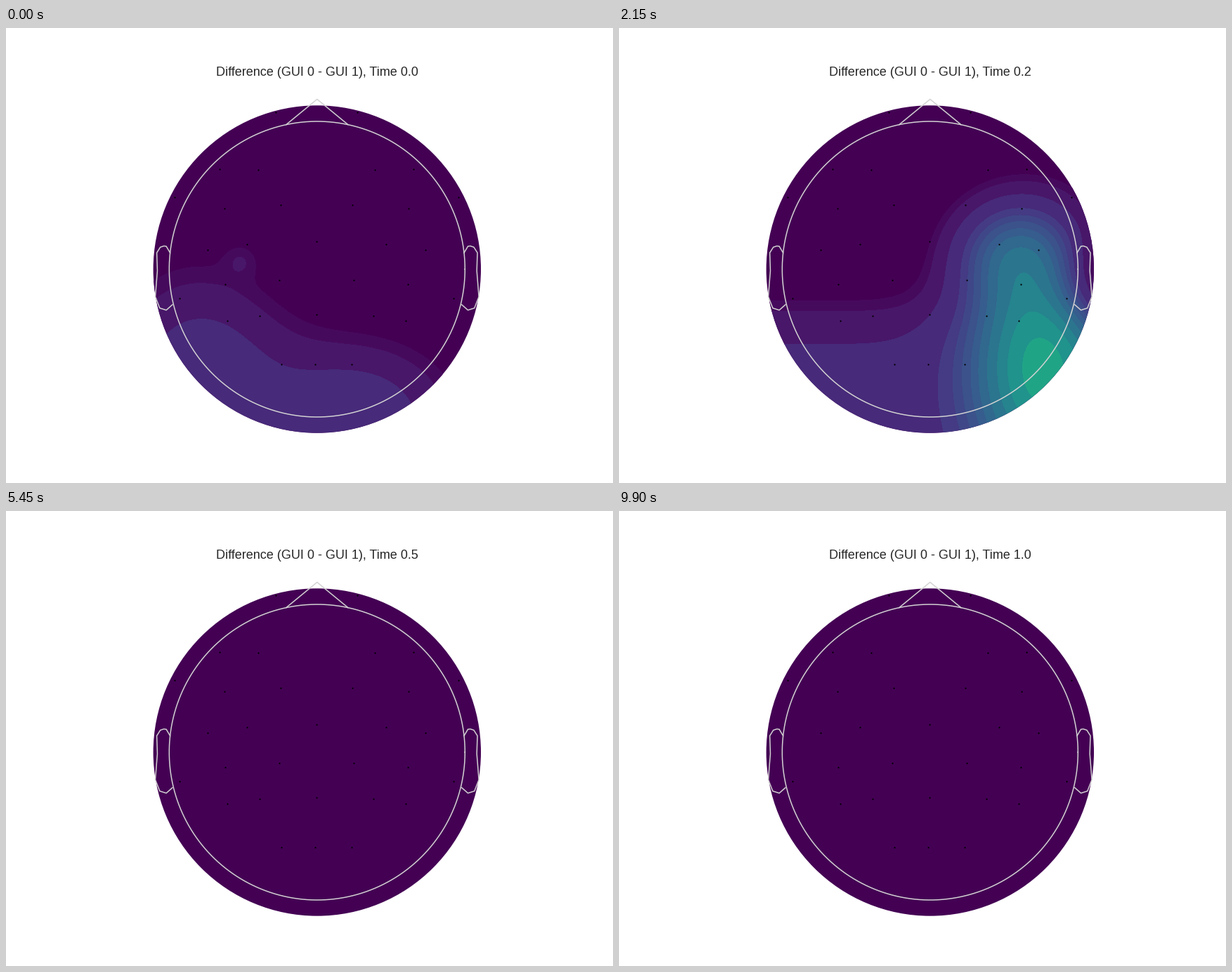
A matplotlib script for the animation above (10000 ms loop, 864 px wide and 648 px high).

```python
import numpy as np
import matplotlib.pyplot as plt
from matplotlib.animation import FuncAnimation
from matplotlib.patches import Circle

W, H, DPI = 864, 648, 108
CX, CY, DISC_R, HEAD_R = 442.8, 343.5, 233.2, 210.5
FRAMES, INTERVAL = 200, 50
LEVELS = np.array([1.5, 3.5, 8.5, 15.5, 19.5, 23, 27, 31, 36, 42, 48, 55])
VIRIDIS = plt.get_cmap("viridis")
BANDS = VIRIDIS(np.append((LEVELS[:-1] + LEVELS[1:]) / 2, 58.5) / 100)

span = np.linspace(-DISC_R - 2, DISC_R + 2, 150)
GX, GY = np.meshgrid(CX + span, CY + span)


def bump(x, y, rx, ry, height, tilt=0, power=2):
    """Elliptic hill; a higher power gives a flatter top."""
    c, s = np.cos(np.radians(tilt)), np.sin(np.radians(tilt))
    u = ((GX - x) * c + (GY - y) * s) / rx
    v = ((GY - y) * c - (GX - x) * s) / ry
    return height * np.exp(-np.hypot(u, v) ** power)


def rise(y, width, height):
    """Smooth step that grows towards the back of the head."""
    return height * (1 + np.tanh((GY - y) / width)) / 2


dark = np.full_like(GX, -3.0)

left_back = (-4 + bump(275, 500, 125, 150, 17)
             + bump(500, 560, 135, 110, 18)
             + bump(335, 330, 25, 25, 4))

centre_left = (-4 + rise(420, 70, 16)
               + bump(385, 365, 130, 98, 25, tilt=25, power=4)
               + bump(300, 460, 70, 70, 6)
               + bump(600, 480, 80, 75, 17)
               + bump(660, 360, 70, 70, 7))

right_back = (-5 + rise(400, 60, 16)
              + bump(605, 480, 100, 163, 49)
              + bump(560, 320, 90, 80, 26)
              + bump(690, 370, 70, 70, -18))

broad = (-3 + rise(288, 25, 20)
         + bump(352, 385, 36, 85, 3.2, power=4)
         + bump(590, 480, 115, 115, 17.5, power=3)
         + bump(255, 345, 50, 60, -8) + bump(625, 335, 60, 50, -10)
         + bump(225, 265, 45, 45, 10) + bump(650, 260, 45, 45, 8)
         + bump(608, 285, 18, 18, -5))

back_rim = (-4 + bump(500, 555, 220, 82, 16, tilt=-8, power=3)
            + bump(605, 455, 50, 35, 9)
            + bump(515, 540, 35, 35, 4.5)
            + bump(263, 485, 30, 35, 8)
            + bump(214, 340, 15, 50, 7))

two_lobes = (-4 + bump(345, 510, 85, 165, 9.5, power=3)
             + bump(430, 565, 45, 45, 7)
             + bump(605, 490, 62, 65, 21)
             + bump(505, 535, 35, 38, 11)
             + bump(675, 330, 30, 110, 10))

TIMELINE = [(0, left_back), (20, centre_left), (43, right_back), (60, broad), (70, dark)]
BURSTS = [(81, 88, 101, back_rim), (118, 122, 126, back_rim), (133, 134, 138, two_lobes),
          (145, 153, 161, back_rim), (174, 179, 184, two_lobes), (187, 192, 198, back_rim)]
for start, peak, end, pattern in BURSTS:
    TIMELINE += [(start, dark), (peak, pattern), (end, dark)]
TIMELINE.append((FRAMES, dark))


def surface(i):
    for (t0, a), (t1, b) in zip(TIMELINE, TIMELINE[1:]):
        if t0 <= i < t1:
            return a + (b - a) * (i - t0) / (t1 - t0)


plt.rcParams["font.family"] = "Liberation Sans"
fig = plt.figure(figsize=(W / DPI, H / DPI), dpi=DPI, facecolor="white")
ax = fig.add_axes([0, 0, 1, 1])
ax.set(xlim=(0, W), ylim=(H, 0))
ax.axis("off")

disc = ax.add_patch(Circle((CX, CY), DISC_R, fc=VIRIDIS(0.0), ec="none", zorder=1))
title = ax.text(CX, 68, "", fontsize=12, color="#262626", ha="center", va="baseline")

# Sensors: distance from the midline and height, mirrored left to right
PAIRS = [(58, 120), (138, 201), (83, 202), (202, 241), (131, 257), (51, 252), (155, 316),
         (99, 308), (130, 365), (53, 359), (195, 385), (127, 417), (81, 410), (50, 479)]
MIDLINE = [(0, 304), (0, 408), (-2, 479)]
sensors = np.array(PAIRS + [(-x, y) for x, y in PAIRS] + MIDLINE)
ax.plot(441.5 + sensors[:, 0], sensors[:, 1], "o", color="black", ms=1.5, mew=0, zorder=3)


def outline(x, y):
    """Line in head units: radius 1, y up."""
    ax.plot(CX + HEAD_R * np.asarray(x), CY - HEAD_R * np.asarray(y),
            color="lightgray", lw=1, zorder=4)


angle = np.linspace(0, 2 * np.pi, 200)
outline(np.cos(angle), np.sin(angle))
outline([-0.209, 0, 0.209], [0.978, 1.15, 0.978])
ear_x = np.array([.994, 1.02, 1.036, 1.06, 1.084, 1.08, 1.094, 1.064, 1.02, .978])
ear_y = [.111, .155, .157, .149, .111, -.011, -.186, -.263, -.277, -.24]
outline(ear_x, ear_y)
outline(-ear_x, ear_y)

shown = []


def update(i):
    while shown:
        shown.pop().remove()
    z = surface(i)
    if z.max() > LEVELS[0]:
        bands = ax.contourf(GX, GY, z, levels=LEVELS, colors=BANDS,
                            extend="max", zorder=2)
        bands.set_clip_path(disc)
        shown.append(bands)
    title.set_text(f"Difference (GUI 0 - GUI 1), Time {i * 0.005:.1f}")
    return []


anim = FuncAnimation(fig, update, frames=FRAMES, interval=INTERVAL,
                     init_func=lambda: [], repeat=True, repeat_delay=0)
plt.show()
```
